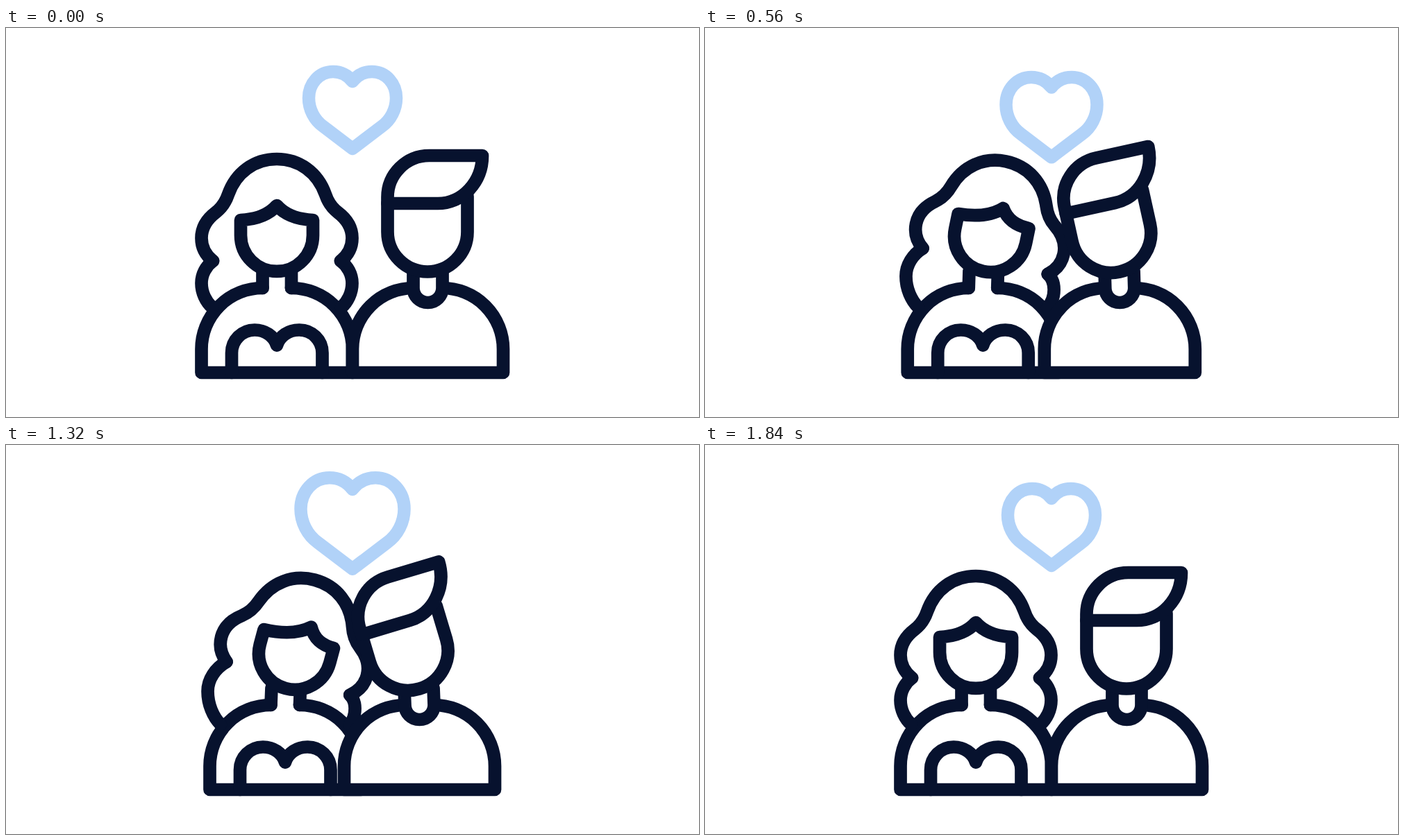
Write an HTML page that moves like this. It is 998 px wide and 561 px high and loops after 1.96 s.

```html
<!DOCTYPE html>
<html lang="en">
<head>
<meta charset="utf-8">
<title>Couple</title>
<style>
  html, body { margin: 0; width: 100%; height: 100%; overflow: hidden; background: #fff; }
  svg { display: block; width: 100%; height: 100%; }
  path { fill: none; stroke: #07122e; stroke-width: 18.7; stroke-linecap: round; stroke-linejoin: round; }
  .solid { fill: #fff; }
  #heart path { stroke: #b1d2f8; stroke-width: 18.5; }
</style>
</head>
<body>
<svg viewBox="0 0 998 561">
  <g id="woman">
    <path id="neckW"/>
    <path d="M369.5 375A88 88 0 0 0 281.5 463V497H499V463A88 88 0 0 0 411 375"/>
    <path d="M325 497V468.5A33 33 0 0 1 358 435.5C373 435.5 386 444 390 457.5C394 444 407 435.5 422 435.5A33 33 0 0 1 455.5 468.5V497"/>
    <path id="curls"/>
    <g id="headW">
      <path d="M298 336C288 328 281.5 317 281.5 303C281.5 288 289.5 275.5 302 266C311 259 316 252 320 240C331 208.5 357.5 189 390 189C422.5 189 449 208.5 460 240C464 252 469 259 478 266C490.5 275.5 498.5 288 498.5 303C498.5 317 492 328 482 336"/>
      <path id="faceW" class="solid"/>
    </g>
  </g>
  <g id="man">
    <path class="solid" d="M587 375A88 88 0 0 0 499 463V497H716V463A88 88 0 0 0 628 375"/>
    <path id="neckM" class="solid"/>
    <g id="headM">
      <path class="solid" d="M549.5 253V294A57.5 57.5 0 0 0 664.5 294V243"/>
      <path class="solid" d="M549.5 253V244A60 60 0 0 1 609.5 184H686A64 69 0 0 1 622 253Z"/>
    </g>
  </g>
  <g id="heart">
    <path id="heartLine"/>
  </g>
</svg>
<script>
const LOOP = 1960, STEP = 40;
const $ = id => document.getElementById(id);
const set = (id, name, value) => $(id).setAttribute(name, value);
const mix = (a, b, k) => a + (b - a) * k;

// Keys are [ms, value]; every span eases in and out.
const LEAN = [[155, 0], [690, 1], [1348, 1], [1850, 0]];
const TILT_W = [[182, 0], [734, 1], [1288, 1], [1840, 0]];
const TILT_M = [[193, 0], [750, 1], [1272, 1], [1829, 0]];
const RISE = [[200, 0], [960, 22], [1040, 21.5], [1420, -11], [1840, 0]];
const BEAT = [[160, 1], [360, 1.2], [640, 1], [1170, 1], [1340, 1.19], [1520, 1]];

function tween(keys, t) {
  if (t <= keys[0][0]) return keys[0][1];
  for (let i = 1; i < keys.length; i++) {
    const [a, from] = keys[i - 1], [b, to] = keys[i];
    if (t < b) {
      const p = (t - a) / (b - a);
      return mix(from, to, p * p * (3 - 2 * p));
    }
  }
  return keys[keys.length - 1][1];
}

function spin(x, y, cx, cy, deg) {
  const a = deg * Math.PI / 180, c = Math.cos(a), s = Math.sin(a);
  return [cx + (x - cx) * c - (y - cy) * s, cy + (x - cx) * s + (y - cy) * c];
}

// Lower hair lobe: starts on the turning head, ends on the still shoulder.
function curl([x, y], mx, my, ex) {
  const ey = 403, bend = mx - x, tail = mx - ex;
  return `M${x} ${y}C${x + bend * .6} ${mix(y, my, .22)} ${mx} ${mix(y, my, .6)} ${mx} ${my}` +
    `C${mx} ${mix(my, ey, .4)} ${ex + tail * .58} ${mix(my, ey, .77)} ${ex} ${ey}`;
}

// The parting slides sideways as the head turns.
function face(k) {
  const peak = 390 + 13 * k, l = (peak - 338) / 52, r = (442 - peak) / 52;
  return `M338 277C${338 + 22 * l} 276 ${peak - 12 * l} 269.5 ${peak} 256` +
    `C${peak + 12 * r} ${269.5 + 3 * k} ${442 - 22 * r} ${276 + k} 442 277V299A52 52 0 0 1 338 299Z`;
}

function heart(s) {
  const p = (x, y) => `${499 + x * s} ${119 + (y - 119) * s} `;
  const half = m => [[-7 * m, 68], [-17 * m, 63], [-28 * m, 63], [-48 * m, 63], [-63 * m, 80],
    [-63 * m, 101], [-63 * m, 117], [-55 * m, 133], [-42 * m, 142]].map(q => p(...q)).join('');
  const side = m => `M${p(0, 77)}C${half(m)}L${p(0, 174)}`;
  return side(1) + side(-1);
}

function draw(t) {
  const lean = 12 * tween(LEAN, t), k = tween(TILT_W, t), n = tween(TILT_M, t);
  const turnW = 15.2 * k, turnM = -17 * n;

  set('woman', 'transform', `translate(${lean} 0)`);
  set('headW', 'transform', `rotate(${turnW} 390 353)`);
  set('faceW', 'd', face(k));
  set('neckW', 'd', `M${369.5 + k} 350L369.5 375M${411 + k} 350L411 375`);
  set('curls', 'd',
    curl(spin(298, 336, 390, 353, turnW), mix(281.5, 278.5, k), mix(368, 355, k), 297) +
    curl(spin(482, 336, 390, 353, turnW), mix(498.5, 490.5, k), mix(368, 380, k), 483));

  set('man', 'transform', `translate(${-lean} 0)`);
  set('headM', 'transform', `rotate(${turnM} 607.5 350)`);
  set('neckM', 'd', `M${586.5 - n} 350L586.5 375A21 21 0 0 0 628.5 375L${628.5 - n} 350`);

  set('heart', 'transform', `translate(0 ${tween(RISE, t)})`);
  set('heartLine', 'd', heart(tween(BEAT, t)));
}

const start = performance.now();
function tick() {
  const t = (performance.now() - start) % LOOP;
  draw(Math.floor(t / STEP) * STEP);
  requestAnimationFrame(tick);
}
tick();
</script>
</body>
</html>
```
